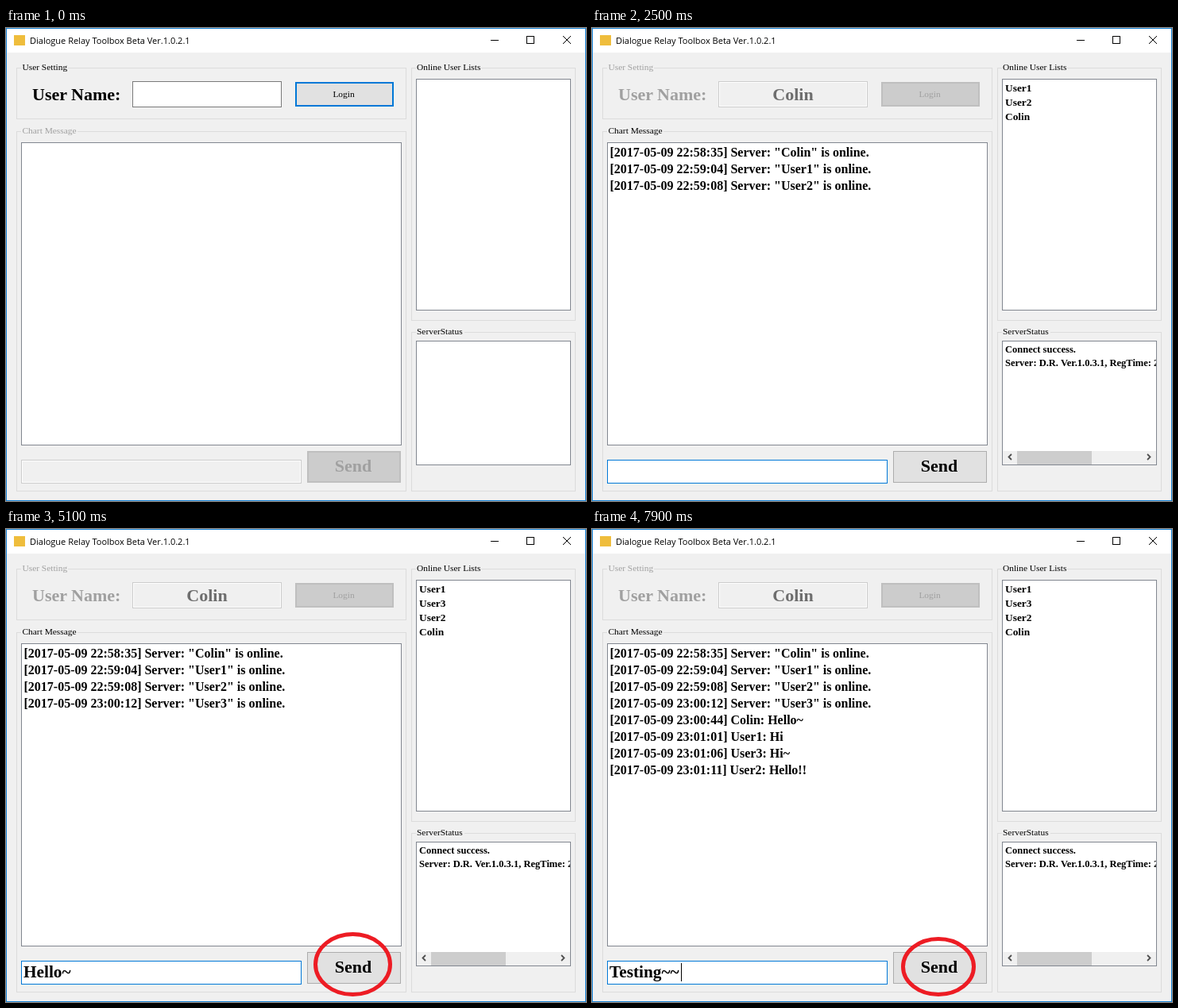
Write an HTML page that moves like this. It is 730 by 596 pixels and loops after 8 s.

```html
<!DOCTYPE html>
<html lang="en">
<head>
<meta charset="utf-8">
<title>Chat client</title>
<style>
  html, body { margin: 0; width: 100%; height: 100%; overflow: hidden; background: #f0f0f0; }
  svg { display: block; }
  rect, path { shape-rendering: crispEdges; }
  text { font-family: "Liberation Serif", serif; white-space: pre; }
  .title { font: 11px "Open Sans", sans-serif; }
  .caption { font-size: 11.4px; }
  .big { font-size: 22px; font-weight: bold; }
  .entry { font-size: 21.3px; font-weight: bold; }
  .message { font-size: 16px; font-weight: bold; }
  .user { font-size: 13.4px; font-weight: bold; }
  .status { font-size: 12.5px; font-weight: bold; }
  .middle { text-anchor: middle; }

  .frame { fill: none; stroke: #dcdcdc; }
  .list { fill: #fff; stroke: #828790; }
  .line { fill: none; stroke: #000; }
  .smooth { shape-rendering: auto; }
  .mark { fill: none; stroke: #ed1c24; stroke-width: 5; }

  .field rect { fill: #fff; stroke: #7a7a7a; }
  .button rect { fill: #e1e1e1; stroke: #adadad; }
  .field .inner, .button .inner { fill: none; stroke: none; }
  .focus rect, .button.focus .inner { stroke: #0078d7; }
  .field.off rect { fill: #f0f0f0; stroke: #ccc; }
  .field.off .inner { stroke: #fff; }
  .field.off text { fill: #6d6d6d; }
  .button.off rect { fill: #ccc; stroke: #bfbfbf; }
  .off text { fill: #a0a0a0; }
</style>
</head>
<body>
<svg width="730" height="596" viewBox="0 0 730 596">
  <rect width="730" height="596" fill="#f0f0f0"/>
  <rect width="730" height="31" fill="#fff"/>
  <rect x=".5" y=".5" width="729" height="595" fill="none" stroke="#1883d7"/>
  <rect x="10" y="9" width="14" height="13" fill="#efbd3c"/>
  <text class="title" x="30" y="20">Dialogue Relay Toolbox Beta Ver.1.0.2.1</text>
  <path class="line" d="M610 15.5H620M655.5 10.5H664.5V19.5H655.5Z"/>
  <path class="line smooth" d="M701 10L711 20M711 10L701 20"/>

  <path class="frame" d="M19 50.5H13.5V114.5H503.5V50.5H78
    M19 130.5H13.5V583.5H503.5V130.5H90
    M516 50.5H510.5V368.5H716.5V50.5H598
    M516 383.5H510.5V583.5H716.5V383.5H577"/>

  <g id="setting">
    <text class="caption" x="20.5" y="53">User Setting</text>
    <text class="big" x="33" y="91">User Name:</text>
  </g>
  <g id="chat"><text class="caption" x="20.5" y="133">Chart Message</text></g>
  <text class="caption" x="517" y="53">Online User Lists</text>
  <text class="caption" x="517" y="386">ServerStatus</text>

  <rect class="list" x="19.5" y="144.5" width="478" height="381"/>
  <rect class="list" x="516.5" y="64.5" width="194" height="291"/>
  <rect class="list" x="516.5" y="394.5" width="194" height="156"/>

  <g id="name">
    <rect x="159.5" y="67.5" width="187" height="32"/>
    <rect class="inner" x="160.5" y="68.5" width="185" height="30"/>
    <text class="big middle" x="253" y="91"></text>
  </g>
  <g id="login">
    <rect x="364.5" y="68.5" width="123" height="30"/>
    <rect class="inner" x="365.5" y="69.5" width="121" height="28"/>
    <text class="caption middle" x="425" y="87">Login</text>
  </g>
  <g id="input">
    <rect x="19.5" y="544.5" width="352" height="29"/>
    <rect class="inner" x="20.5" y="545.5" width="350" height="27"/>
    <text class="entry" x="22" y="565"></text>
  </g>
  <g id="send">
    <rect x="379.5" y="533.5" width="117" height="39"/>
    <rect class="inner" x="380.5" y="534.5" width="115" height="37"/>
    <text class="big middle" x="437" y="559">Send</text>
  </g>
  <path class="line" data-show="7400 8000" d="M112.5 547V570"/>

  <g id="messages"></g>
  <g id="users"></g>
  <svg x="517" y="395" width="193" height="155" data-show="2000 8000">
    <text class="status" x="3" y="14">Connect success.</text>
    <text class="status" x="3" y="31">Server: D.R. Ver.1.0.3.1, RegTime: 2017-05-09</text>
    <rect y="138" width="193" height="17" fill="#f0f0f0"/>
    <rect x="18" y="138" width="94" height="17" fill="#cdcdcd"/>
    <path class="smooth" d="M11 142L7.5 145.5L11 149M182 142L185.5 145.5L182 149"
      fill="none" stroke="#505050" stroke-width="1.8"/>
  </svg>

  <circle class="mark" data-show="1000 2000" cx="424" cy="83" r="44.5"/>
  <rect class="mark" data-show="3300 4100" x="499.5" y="31.5" width="120" height="142" style="stroke-width:3"/>
  <ellipse class="mark" data-show="5100 6100" cx="436.5" cy="548.5" rx="47" ry="38"/>
  <ellipse class="mark" data-show="7900 8000" cx="436" cy="551.5" rx="44.5" ry="35"/>
</svg>
<script>
  const LOOP = 8000;
  const ME = "Colin";
  const $ = id => document.getElementById(id);

  const messages = [
    [2000, `22:58:35] Server: "${ME}" is online.`],
    [2500, '22:59:04] Server: "User1" is online.'],
    [2500, '22:59:08] Server: "User2" is online.'],
    [4100, '23:00:12] Server: "User3" is online.'],
    [6100, `23:00:44] ${ME}: Hello~`],
    [6900, "23:01:01] User1: Hi"],
    [6900, "23:01:06] User3: Hi~"],
    [6900, "23:01:11] User2: Hello!!"],
  ];

  // Each track lists [start time, value]; a value holds until the next entry.
  const states = {
    setting: [[0, ""], [2000, "off"]],
    chat: [[0, "off"], [2000, ""]],
    name: [[0, "field"], [500, "field focus"], [2000, "field off"]],
    login: [[0, "button focus"], [500, "button"], [2000, "button off"]],
    input: [[0, "field off"], [2000, "field"], [2500, "field focus"], [6100, "field"], [7400, "field focus"]],
    send: [[0, "button off"], [2000, "button"], [6100, "button focus"], [6900, "button"]],
  };
  const typed = {
    name: [[0, ""], [500, ME]],
    input: [[0, ""], [4600, "Hello~"], [6100, ""], [7400, "Testing~~"]],
  };
  const users = [
    [0, []],
    [2000, [ME]],
    [2500, ["User1", "User2", ME]],
    [4100, ["User1", "User3", "User2", ME]],
  ];

  const valueAt = (track, t) => track.filter(([start]) => start <= t).pop()[1];

  function fillRows(id, type, x, y, pitch, rows) {
    $(id).innerHTML = rows.map((row, i) =>
      `<text class="${type}" x="${x}" y="${y + i * pitch}">${row}</text>`).join("");
  }

  function render(t) {
    for (const id in states) $(id).setAttribute("class", valueAt(states[id], t));
    for (const id in typed) $(id).querySelector("text").textContent = valueAt(typed[id], t);
    const visible = messages.filter(([start]) => start <= t);
    fillRows("messages", "message", 22.5, 162, 21, visible.map(([, text]) => "[2017-05-09 " + text));
    fillRows("users", "user", 520, 80, 18, valueAt(users, t));
    for (const el of document.querySelectorAll("[data-show]")) {
      const [from, to] = el.dataset.show.split(" ").map(Number);
      el.style.display = t >= from && t < to ? "" : "none";
    }
  }

  function tick() {
    render(performance.now() % LOOP);
    requestAnimationFrame(tick);
  }
  tick();
</script>
</body>
</html>
```
